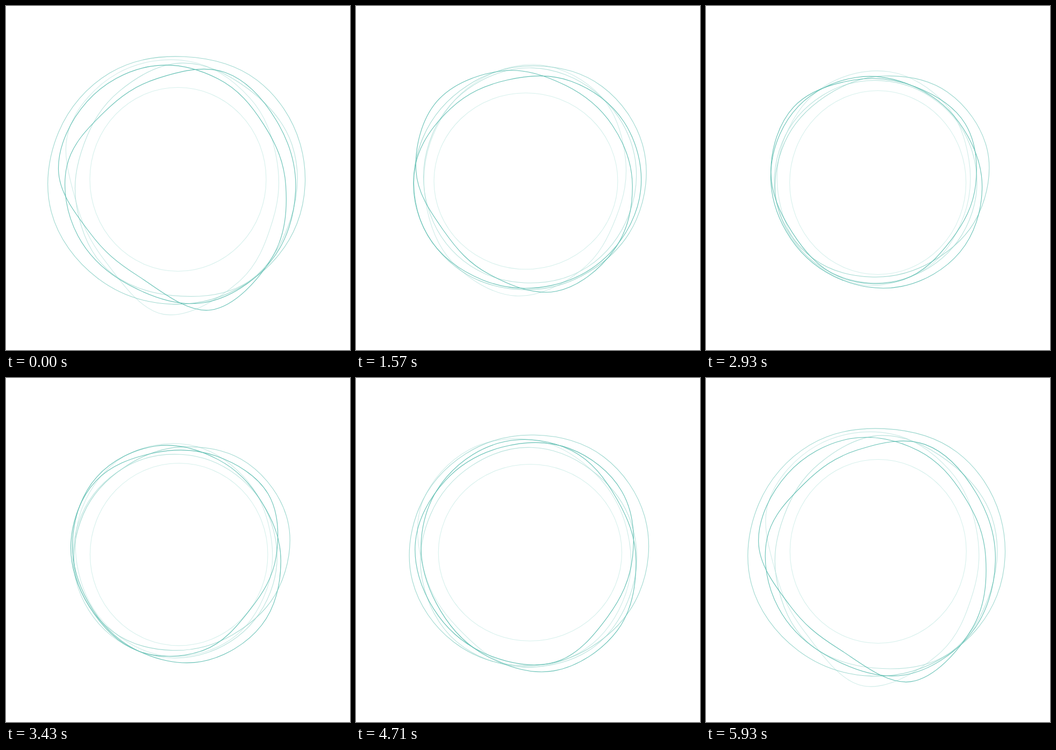
An HTML page for the animation above (6000 ms loop, 640 by 640 pixels).

```html
<!DOCTYPE html>
<html lang="en">
<head>
<meta charset="utf-8">
<title>Drifting rings</title>
<style>
  html, body { margin: 0; width: 100%; height: 100%; overflow: hidden; background: #fff; }
  svg { display: block; width: 100%; height: 100%; }
  path, ellipse { fill: none; stroke-width: 1.1; }
</style>
</head>
<body>
<svg id="stage" viewBox="0 0 640 640"></svg>
<script>
const LOOP = 6000, STEPS = 84, CENTER = 320;
const { sin, cos, tan, PI } = Math;
const rad = degrees => degrees * PI / 180;

// Each ring starts as a smooth curve through its open radii, evenly spaced
// clockwise from the angle turn. It shrinks and rounds off by mid-loop.
// A wave is [lobes, height, direction]: squeeze peaks at mid-loop, while
// sway leans one way in the first half and the other way in the second.
const rings = [
  { color: "#cfece8", turn: 24, shrink: 23,
    open: [193, 224, 255, 205, 195, 222, 225, 218, 200, 187],
    squeeze: [[2, 10, 182], [1, 8, 180]], sway: [[2, 9, -117]] },
  { color: "#b9e3dd", turn: 20, shrink: 23,
    open: [223, 233, 219, 215, 196, 186, 195, 214, 211, 221],
    squeeze: [[1, 9, 122]], sway: [[1, 10, -74]] },
  { color: "#9cd7ce", turn: 21, shrink: 43,
    open: [237, 234, 235, 239, 244, 238, 233, 226, 234, 236],
    squeeze: [[2, 10, -51], [1, 8, -17]], sway: [] },
  { color: "#66c1b5", turn: 6, shrink: 17,
    open: [220, 232, 237, 219, 215, 208, 184, 189, 215, 212],
    squeeze: [[1, 9, 112], [2, 7, 97]], sway: [[2, 11, -42]] },
  { color: "#66c1b5", turn: 4, shrink: 21,
    open: [201, 229, 253, 197, 193, 223, 221, 214, 199, 188],
    squeeze: [[3, 8, -84], [1, 8, 180]], sway: [[2, 12, 92]] }
];

const stage = document.getElementById("stage");
function add(tag, color) {
  const node = document.createElementNS("http://www.w3.org/2000/svg", tag);
  node.setAttribute("stroke", color);
  return stage.appendChild(node);
}
function set(node, values) {
  for (const name in values) node.setAttribute(name, values[name]);
}

const core = add("ellipse", "#d6f0ec");
for (const ring of rings) {
  ring.node = add("path", ring.color);
  ring.mean = ring.open.reduce((sum, r) => sum + r) / ring.open.length;
}

const ripple = (waves, angle) => waves.reduce(
  (sum, [lobes, height, direction]) => sum + height * cos(lobes * angle - rad(direction)), 0);

function ringPoints({ open, turn, mean, shrink, squeeze, sway }, phase) {
  const closed = (1 - cos(phase)) / 2;
  return open.map((radius, i) => {
    const angle = rad(turn) + i / open.length * 2 * PI;
    const r = mean - shrink * closed
      + (radius - mean) * (1 - closed) ** 2
      + ripple(squeeze, angle) * closed
      + ripple(sway, angle) * sin(phase);
    return [CENTER + r * cos(angle), CENTER + r * sin(angle)];
  });
}

// Closed spline whose handles reproduce a circle when all radii are equal.
function outline(points) {
  const n = points.length;
  const reach = 2 / 3 * tan(PI / (2 * n)) / sin(2 * PI / n);
  const at = i => points[(i + n) % n];
  const handle = (i, side) =>
    at(i).map((c, axis) => c + side * reach * (at(i + 1)[axis] - at(i - 1)[axis]));
  const curves = points.map((_, i) => `C${handle(i, 1)} ${handle(i + 1, -1)} ${at(i + 1)}`);
  return `M${at(0)}${curves.join("")}Z`;
}

function draw(time) {
  const step = Math.floor((time % LOOP) / LOOP * STEPS + 0.1) % STEPS;
  const phase = step / STEPS * 2 * PI;
  for (const ring of rings) set(ring.node, { d: outline(ringPoints(ring, phase)) });
  const stretch = 3.5 * cos(2 * phase);
  set(core, {
    cx: 320 - 4 * sin(phase), cy: 325.5 - 3 * cos(phase),
    rx: 167.5 - stretch, ry: 167.5 + stretch
  });
}

const start = performance.now();
function tick() {
  draw(performance.now() - start);
  requestAnimationFrame(tick);
}
tick();
</script>
</body>
</html>
```
